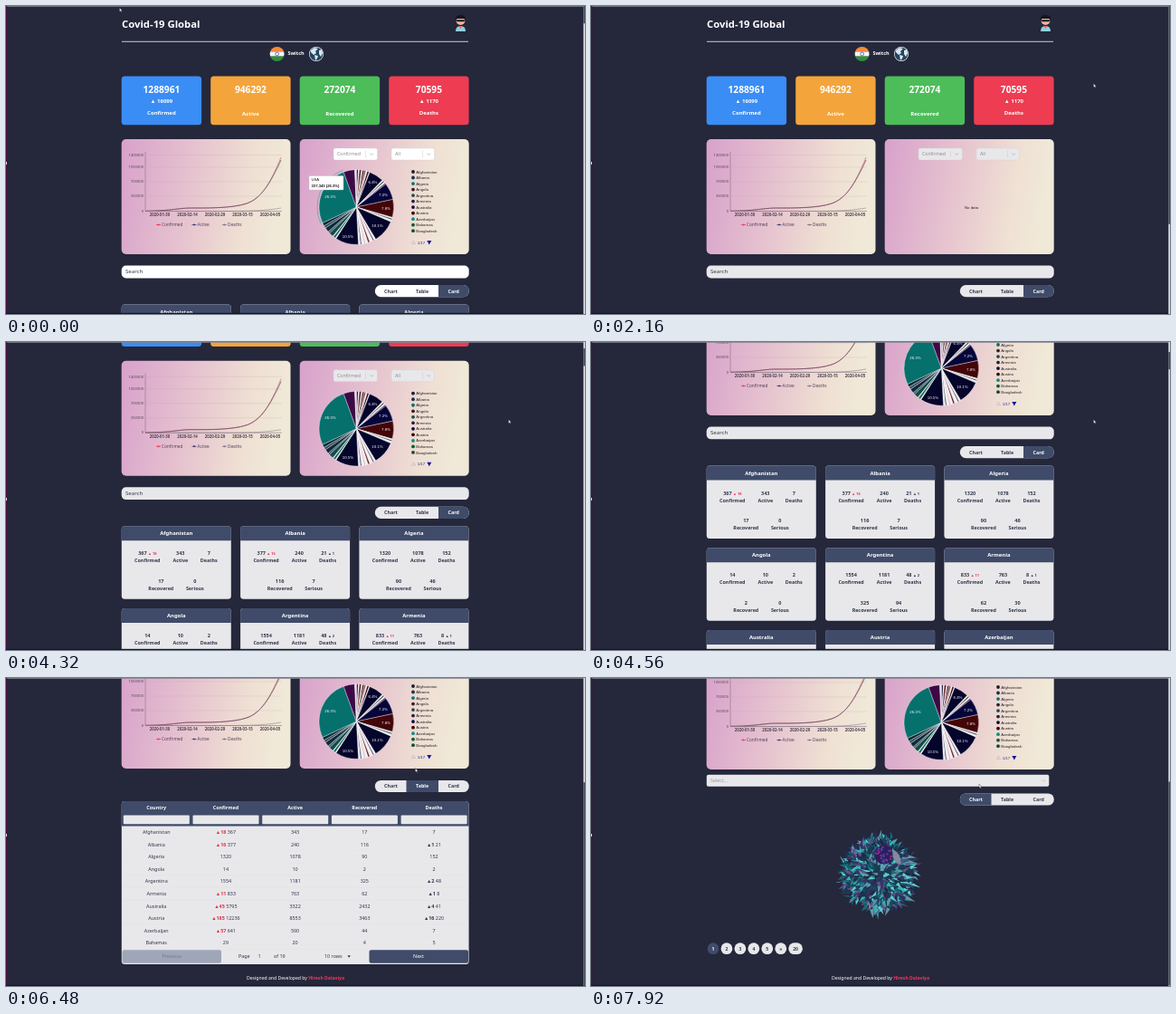
These frames come from a looping animation (640 by 340 pixels, 8 s). An HTML page:

```html
<!DOCTYPE html>
<html lang="en">
<head>
<meta charset="utf-8">
<title>Covid-19 Global</title>
<style>
html, body { margin: 0; width: 100%; height: 100%; overflow: hidden; background: #25273b; }
svg { display: block; font-family: "Noto Sans", "Open Sans", sans-serif; }
.arial { font-family: "Liberation Sans", Arial, sans-serif; }
</style>
</head>
<body>
<svg id="stage" width="640" height="340" viewBox="0 0 640 340"></svg>
<script>
const LOOP = 8000, NAVY = '#3f4b69', INK = '#33354a', LIGHT = 'var(--light)', RED = '#e5304c';

const rect = (x, y, w, h, fill, r = 0, more = '') =>
  `<rect x="${x}" y="${y}" width="${w}" height="${h}" rx="${r}" fill="${fill}" ${more}/>`;
const dot = (x, y, r, fill) => `<circle cx="${x}" cy="${y}" r="${r}" fill="${fill}"/>`;
const path = (d, fill, more = '') => `<path d="${d}" fill="${fill}" ${more}/>`;
const line = (d, color, width) => path(d, 'none', `stroke="${color}" stroke-width="${width}"`);
// y is the vertical middle of the letters
const text = (x, y, s, size, fill, more = '') =>
  `<text x="${x}" y="${y + size * 0.36}" font-size="${size}" fill="${fill}" ${more}>${s}</text>`;
const MID = 'text-anchor="middle" ', BOLD = 'font-weight="700" ', MEDIUM = 'font-weight="500" ';
const group = (id, body) => `<g id="${id}">${body}</g>`;
const range = n => [...Array(n).keys()];
const polar = (cx, cy, r, deg) => {
  const a = deg * Math.PI / 180;
  return [cx + r * Math.sin(a), cy - r * Math.cos(a)].map(v => +v.toFixed(2));
};

// name, confirmed, new, active, deaths, new deaths, recovered, serious
const countries = [
  ['Afghanistan', 367, 18, 343, 7, 0, 17, 0],
  ['Albania', 377, 16, 240, 21, 1, 116, 7],
  ['Algeria', 1320, 0, 1078, 152, 0, 90, 46],
  ['Angola', 14, 0, 10, 2, 0, 2, 0],
  ['Argentina', 1554, 0, 1181, 48, 2, 325, 94],
  ['Armenia', 833, 11, 763, 8, 1, 62, 30],
  ['Australia', 5795, 45, 3322, 41, 4, 2432, 0],
  ['Austria', 12236, 185, 8553, 220, 16, 3463, 0],
  ['Azerbaijan', 641, 57, 590, 7, 0, 44, 0],
  ['Bahamas', 29, 0, 20, 5, 0, 4, 0]
];

function header() {
  const totals = [
    ['1288961', '16099', 'Confirmed', '#3a8df5'], ['946292', '', 'Active', '#f3a53c'],
    ['272074', '', 'Recovered', '#4cbd58'], ['70595', '1170', 'Deaths', '#ee3c52']
  ];
  return text(128, 19.8, 'Covid-19 Global', 11.3, '#fff', BOLD) +
    rect(128, 38.8, 383, 1, '#c9cad2') +
    dot(502.5, 16, 5, '#f0b49a') +
    path('M497 17V13Q498 10 502.5 10T508 13V17L506.5 14H498.5Z', '#15151f') +
    rect(498, 15.3, 9, 2, '#15151f', 1) +
    path('M497 28Q497 22 502.5 22T508 28Z', '#8fd0dc') + path('M500.5 22H504.5L502.5 25Z', '#ee5d62') +
    `<clipPath id="round"><circle cx="299.6" cy="53" r="8"/></clipPath><g clip-path="url(#round)">` +
    rect(291, 45, 17, 5.4, '#f58a3c') + rect(291, 50.4, 17, 5.2, '#f4f4f4') + rect(291, 55.6, 17, 6, '#2f8f3a') + '</g>' +
    `<circle cx="299.6" cy="53" r="1.9" fill="none" stroke="#3a4a9a" stroke-width=".7"/>` +
    text(320.5, 52.5, 'Switch', 5.5, '#fff', MID + BOLD) +
    dot(343, 53, 8, '#e8eef2') + dot(343, 53, 7.3, '#25435f') +
    path('M337 49L341 46L345 47L342 50L343 52L340 54L337 51ZM341 54L345 55L344 58L342 60ZM346 49L349 48L350 52L348 56L346 53Z', '#dbe7ee') +
    totals.map(([n, up, label, color], i) => {
      const x = 127.7 + i * 98.5, c = x + 44.2;
      return rect(x, 77.4, 88.4, 53.8, color, 3.5) +
        text(c, 92, n, 10.2, '#fff', MID + BOLD) +
        (up && text(c, 105, '▲ ' + up, 6, '#fff', MID + BOLD)) +
        text(c, up ? 118.3 : 119, label, 6, '#fff', MID + BOLD);
    }).join('');
}

function lineChart() {
  const names = ['1400000', '1050000', '700000', '350000', '0'];
  const ys = [164.5, 178, 194, 210, 226.3];
  const days = ['2020-01-30', '2020-02-14', '2020-02-29', '2020-03-15', '2020-04-05'];
  const legend = [[166, 'Confirmed', '#e2405a'], [205.5, 'Active', '#3c3c78'], [239, 'Deaths', '#777788']];
  const curve = end => `M154 226.3C185 226 190 223 205 223S250 223.5 266 218S292 196 304 ${end}`;
  return rect(127.7, 147, 186.8, 127, 'url(#pastel)', 5) +
    ys.slice(0, 4).map(y => line(`M154 ${y}H305`, '#b8a0ae', 0.25)).join('') +
    line('M154 161V226.5H305', '#8a7487', 0.6) +
    names.map((s, i) => text(152, ys[i], s, 4.1, '#54465a', 'text-anchor="end" ' + MEDIUM)).join('') +
    days.map((s, i) => line(`M${170 + i * 30.5} 226.5V228`, '#8a7487', 0.5) +
      text(170 + i * 30.5, 230.7, s, 4.3, '#4c4052', MID + BOLD)).join('') +
    line(curve(167), '#d9606c', 0.7) + line(curve(170), '#54486c', 0.7) +
    line('M154 226.5H250C280 226.4 292 225 304 223', '#8c8088', 0.6) +
    legend.map(([x, s, c]) => line(`M${x} 241.5h5`, c, 0.8) + dot(x + 2.5, 241.5, 1, c) +
      text(x + 6, 241.3, s, 4.7, '#54405c')).join('');
}

const select = (x, w, s) => rect(x, 157, w, 13, LIGHT, 2, 'stroke="#d3cbd0" stroke-width=".4"') +
  text(x + 4, 163.5, s, 5.2, '#8d8a92') + line(`M${x + w - 13} 159.5v8`, '#ccc8cc', 0.5) +
  line(`M${x + w - 8} 162.7l1.7 1.7l1.7 -1.7`, '#a5a2a8', 0.7);

function pie() {
  const cx = 387.3, cy = 222, r = 41.3;
  // start angle and colour of each slice
  const slices = [
    [0, '#0a0a38'], [3, '#f4eef0'], [4.5, '#6b1f1f'], [8, '#f4eef0'], [9.5, '#10103c'], [12, '#8a4a3c'],
    [15, '#f4eef0'], [17, '#3c0a14'], [20, '#eee'], [21, '#05052c'], [44, '#f2e6ea'], [46, '#123a44'],
    [48, '#f4eef0'], [50, '#5c2030'], [52, '#05053a'], [78, '#430508'], [106, '#e8e4e8'], [108, '#0a3c3c'],
    [110, '#f0e8ec'], [113, '#05052c'], [149, '#f2ecf0'], [152, '#2a2a50'], [154, '#f4eef0'], [159, '#6b2830'],
    [162, '#f4eef0'], [166, '#c9a4b8'], [168, '#f4eef0'], [172, '#14344a'], [174, '#eee8ec'], [177, '#05052c'],
    [213, '#e8e8e8'], [214.5, '#0c6a50'], [218, '#e8e8e8'], [219, '#134a4c'], [226, '#2e5f60'],
    [229, '#12283c'], [236, '#2c5058'], [240, '#0c2834'], [245, '#06706c'], [340, '#3d0846'], [357.5, '#e8e0ea']
  ];
  const shares = [[405.5, 194.5, '6.4%'], [417, 208, '7.2%'], [420, 223, '7.8%'],
    [410.5, 242, '10.1%'], [378, 254, '10.5%'], [358.5, 210, '26.3%']];
  const names = countries.map(c => c[0]).concat('Bangladesh');
  const colors = ['#1c1c2c', '#16344a', '#08706a', '#3a1c1c', '#1c4a4a', '#2a1c3c', '#05053a', '#3d0505', '#089080', '#075a30', '#134a3c'];
  const wedge = ([a, color], i) => {
    const b = i + 1 < slices.length ? slices[i + 1][0] : 360;
    return path(`M${cx} ${cy}L${polar(cx, cy, r, a)}A${r} ${r} 0 0 1 ${polar(cx, cy, r, b)}Z`, color,
      'stroke="#fff" stroke-width=".35"');
  };
  const halo = `M${polar(cx, cy, r + 2, 245)}A${r + 2} ${r + 2} 0 0 1 ${polar(cx, cy, r + 2, 340)}`;
  return slices.map(wedge).join('') + '<g class="arial">' +
    shares.map(([x, y, s]) => text(x, y, s, 4.4, '#fff', MID)).join('') +
    names.map((s, i) => dot(450, 183 + i * 6.52, 1.9, colors[i]) + text(453.3, 183 + i * 6.52, s, 4.4, '#222')).join('') +
    path('M448.5 262.5h4l-2 -3.5z', 'none', 'stroke="#b5a8b5" stroke-width=".5"') +
    text(454.7, 261, '1/17', 4.4, '#2424a0') + path('M465.3 259h5l-2.5 4.5z', '#1414a0') +
    group('hover', line(halo, '#6fa8a8', 0.9) +
      rect(335, 187.5, 38, 15.5, '#fff', 0.8, 'stroke="#bbb" stroke-width=".4"') +
      text(337.5, 191.7, 'USA', 4.2, '#111') + text(337.5, 198, '337,343 (26.3%)', 4.2, '#111', BOLD)) + '</g>';
}

function tabs() {
  return rect(407.8, -6.6, 104, 13.2, LIGHT, 6.6) +
    group('tabMark', '') +
    ['Chart', 'Table', 'Card'].map((s, i) => text(425.5 + i * 34.6, 0, s, 5.3, INK, MID + BOLD + `id="tab${i}"`)).join('');
}

const tabShapes = [
  'M442.5 -6.6H414.4A6.6 6.6 0 0 0 414.4 6.6H442.5Z',
  'M442.5 -6.6H478V6.6H442.5Z',
  'M478 -6.6H505.2A6.6 6.6 0 0 1 505.2 6.6H478Z'
];

const searchBox = rect(127.7, 286.6, 384, 13.8, LIGHT, 5) + text(132, 293.2, 'Search', 6.1, INK, MEDIUM);

const delta = (n, color) => n ? ` <tspan font-size="3.9" font-weight="600" fill="${color}">▲ ${n}</tspan>` : '';

function card([name, conf, more, active, deaths, moreDeaths, recovered, serious], i) {
  const x = 127.8 + i % 3 * 131.3, y = 329.5 + Math.floor(i / 3) * 90.8;
  const style = MID + 'font-weight="600"';
  const cell = (dx, dy, n, label) => text(x + dx, y + dy, n, 5.5, INK, style) +
    text(x + dx, y + dy + 8, label, 5.4, INK, style);
  return rect(x, y, 121, 80.5, LIGHT, 3.5) +
    path(`M${x} ${y + 16}v-12.5q0 -3.5 3.5 -3.5h114q3.5 0 3.5 3.5v12.5z`, NAVY) +
    text(x + 60.5, y + 8, name, 5.9, '#fff', MID + BOLD) +
    cell(28.5, 30.2, conf + delta(more, RED), 'Confirmed') + cell(65, 30.2, active, 'Active') +
    cell(96.5, 30.2, deaths + delta(moreDeaths, INK), 'Deaths') +
    cell(43.5, 60.8, recovered, 'Recovered') + cell(81, 60.8, serious, 'Serious');
}

const credit = y => `<text x="320" y="${y + 1.5}" font-size="5.1" fill="#fff" text-anchor="middle">` +
  `Designed and Developed by <tspan fill="#f5365c" font-weight="700">Hiresh Dalaviya</tspan></text>`;

function table() {
  const w = 76.7, heads = ['Country', 'Confirmed', 'Active', 'Recovered', 'Deaths'];
  const up = (n, color) => n ? `<tspan fill="${color}" font-weight="700">▲${n}</tspan> ` : '';
  const row = (c, i) => [c[0], up(c[2], RED) + c[1], c[3], c[6], up(c[5], INK) + c[4]]
    .map((s, k) => text(166.2 + k * w, 344.4 + i * 13.53, s, 5.4, INK, MID)).join('') +
    line(`M128 ${351.2 + i * 13.53}H511.5`, '#dcdce2', 0.3);
  return rect(127.8, 310, 383.8, 180, LIGHT, 3.5) +
    path('M127.8 337.5V313.5Q127.8 310 131.3 310H508Q511.6 310 511.6 313.5V337.5Z', NAVY) +
    heads.map((s, k) => text(166.2 + k * w, 317, s, 5.4, '#fff', MID + BOLD) +
      rect(129.8 + k * w, 325.5, 73, 9.8, LIGHT, 1)).join('') +
    countries.map(row).join('') +
    rect(128.5, 474.3, 109.5, 14.5, '#9fa6b8', 2) + text(183.3, 481.5, 'Previous', 5.4, '#717b92', MID + MEDIUM) +
    text(257, 481.5, 'Page', 5.4, INK) + text(280, 481.5, '1', 5.4, INK, MID + MEDIUM) + text(296, 481.5, 'of 19', 5.4, INK) +
    text(352, 481.5, '10 rows', 5.4, INK, MEDIUM) + path('M377.5 480.3h3.4l-1.7 2.5z', INK) +
    rect(401.5, 474.3, 109.5, 14.5, NAVY, 2) + text(456, 481.5, 'Next', 5.4, '#fff', MID + MEDIUM) + credit(505);
}

// ball of many small crooked thorns, drawn from the rim inwards
function virus(cx, cy) {
  let seed = 7;
  const rnd = () => (seed = seed * 16807 % 2147483647) / 2147483647;
  const hues = ['#38b0b4', '#1c6878', '#5ccfd0', '#3a3468', '#6497a8', '#1c2844', '#64508c', '#184a5c', '#22304e'];
  const count = 520;
  const thorns = range(count).map(i => {
    const a = rnd() * 360, [x, y] = polar(cx, cy, 40 * Math.sqrt(1 - i / count), a);
    const lean = a + (rnd() - 0.5) * 110, half = 1.3 + rnd() * 1.4;
    return path(`M${polar(x, y, half, lean - 90)}L${polar(x, y, 5 + rnd() * 7, lean)}L${polar(x, y, half, lean + 90)}Z`,
      hues[Math.floor(rnd() * hues.length)]);
  });
  const bumps = range(22).map(() => {
    const [x, y] = polar(cx + 5, cy - 21, 9 * Math.sqrt(rnd()), rnd() * 360);
    return dot(x, y, 1.2, rnd() < 0.6 ? '#8c2c88' : '#4a44a0');
  });
  return dot(cx, cy, 39, '#1b3a50') + thorns.join('') + dot(cx + 5, cy - 21, 10.5, '#2c1f5c') + bumps.join('') +
    path(`M${cx + 15} ${cy - 27}q10 5 9 17q-7 -2 -9 -9z`, '#85889f');
}

function chartView() {
  return rect(127.8, 279.7, 378.5, 13, LIGHT, 2) + text(132, 286.2, 'Select...', 5.3, '#96969e') +
    line('M498.5 285.5l1.7 1.7l1.7 -1.7', '#b5b5bb', 0.7) +
    virus(318.5, 389) +
    ['1', '2', '3', '4', '5', '»'].map((s, i) => dot(135 + i * 14.95, 471.7, 6.4, i ? LIGHT : NAVY) +
      text(135 + i * 14.95, 471.7, s, 5, i ? INK : '#fff', MID + BOLD)).join('') +
    rect(218.3, 465.3, 15.6, 12.8, LIGHT, 6.4) + text(226.1, 471.7, '20', 5, INK, MID + BOLD) + credit(504);
}

const stage = document.getElementById('stage');
stage.innerHTML = `<defs><linearGradient id="pastel" x2="1" y2=".12">
  <stop offset="0" stop-color="#d8a1cb"/><stop offset=".45" stop-color="#e6c3cf"/>
  <stop offset=".8" stop-color="#efe0d3"/><stop offset="1" stop-color="#f0e9d8"/></linearGradient></defs>` +
  group('page', header() + lineChart() + rect(324.7, 147, 187, 127, 'url(#pastel)', 5) +
    group('pie', pie()) + group('empty', text(420.5, 222, 'No data', 4.3, '#222', MID + 'class="arial"')) +
    select(362, 48.5, 'Confirmed') + select(426, 47.5, 'All') +
    group('search', searchBox) + group('cards', countries.slice(0, 9).map(card).join('')) +
    group('table', table()) + group('chart', chartView()) + group('tabs', tabs())) +
  rect(0, 0, 640, 0.8, '#85858f') + rect(0, 0, 1.3, 340, '#45123f') + rect(0, 338.8, 640, 1.2, '#191326') +
  rect(0, 172, 1, 3, '#ddd') + rect(638.3, 0, 1.7, 340, '#dcdce0') +
  `<rect id="thumb" x="638.3" width="1.7" fill="#474955"/>` +
  `<path id="cursor" d="M0 0V4.3L1 3.4L1.7 5L2.4 4.7L1.7 3.2H3Z" fill="#fff" stroke="#111" stroke-width=".35"/>`;

const el = id => document.getElementById(id);
const show = (id, on) => el(id).style.display = on ? '' : 'none';

// linear interpolation over [time, ...values] keys
function at(keys, t) {
  const i = keys.findIndex(k => k[0] > t);
  if (i < 0) return keys[keys.length - 1].slice(1);
  const a = keys[i - 1], b = keys[i], f = (t - a[0]) / (b[0] - a[0]);
  return a.slice(1).map((v, n) => v + (b[n + 1] - v) * f);
}

const RELOAD = 400, LOADED = 3760, TO_TABLE = 5840, TO_CHART = 7280;
const scrolls = [[0, 0], [3920, 0], [4320, 126], [4640, 215], [4760, 229], [8000, 229]];
const moves = [[0, 125.5, 2], [1200, 125.5, 2], [1700, 555.5, 85.5], [5400, 555.5, 85.5], [5760, 461, 86.5],
  [6000, 460, 88], [6480, 452.5, 99.5], [7120, 429, 117], [8000, 429, 117]];

function draw(t) {
  const view = t < TO_TABLE ? 2 : t < TO_CHART ? 1 : 0;
  const loading = t >= RELOAD && t < LOADED;
  const scroll = view === 2 ? at(scrolls, t)[0] : view ? 174 : 173;
  const height = loading ? 480 : view === 2 ? 6000 : 514;
  stage.style.setProperty('--light', t < 80 ? '#fff' : '#e8e8eb');
  show('hover', t < RELOAD);
  show('pie', !loading);
  show('empty', loading);
  show('search', view === 2);
  show('cards', view === 2 && !loading);
  show('table', view === 1);
  show('chart', view === 0);
  el('tabs').setAttribute('transform', `translate(0 ${[307, 293.5, 314.7][view]})`);
  el('tabMark').innerHTML = path(tabShapes[view], NAVY);
  range(3).forEach(i => el('tab' + i).setAttribute('fill', i === view ? '#fff' : INK));
  el('page').setAttribute('transform', `translate(0 ${-scroll})`);
  el('thumb').setAttribute('y', scroll / height * 340);
  el('thumb').setAttribute('height', 340 * 340 / height);
  el('cursor').setAttribute('transform', `translate(${at(moves, t)})`);
}

function tick() {
  draw(performance.now() % LOOP);
  requestAnimationFrame(tick);
}
tick();
</script>
</body>
</html>
```
